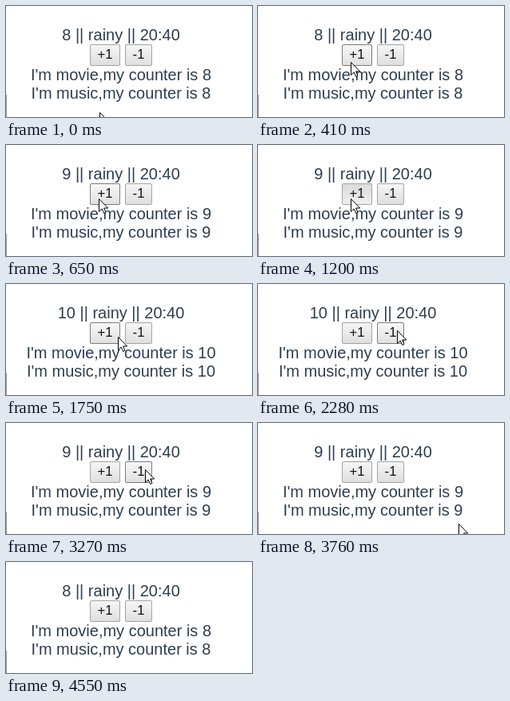
Recreate the animation shown at these times as an HTML page. Size 308 by 139 pixels, loop 4860 ms.

```html
<!DOCTYPE html>
<html lang="en">
<head>
<meta charset="utf-8">
<title>Counter</title>
<style>
  html, body { margin: 0; width: 100%; height: 100%; overflow: hidden; background: #fff; }
  svg { display: block; width: 308px; height: 139px; }
  text { font: 20px "Liberation Sans", Arial, sans-serif; fill: #2c3e50; text-anchor: middle; }
  .btn text { font-size: 16.67px; fill: #111; }
  .btn rect { fill: url(#normal); stroke: #a3a3a3; }
  .btn.hover rect { fill: url(#hover); stroke: #7c7c7c; }
  .btn.press rect { fill: url(#press); stroke: #a3a3a3; }
</style>
</head>
<body>
<svg viewBox="0 0 308 139">
  <defs>
    <linearGradient id="normal" x2="0" y2="1"><stop stop-color="#f6f6f6"/><stop offset="1" stop-color="#dedede"/></linearGradient>
    <linearGradient id="hover" x2="0" y2="1"><stop stop-color="#f8f8f8"/><stop offset="1" stop-color="#e0e0e0"/></linearGradient>
    <linearGradient id="press" x2="0" y2="1"><stop stop-color="#dadada"/><stop offset="1" stop-color="#f0f0f0"/></linearGradient>
  </defs>
  <path d="M.5 111V139" stroke="#999"/>
  <text id="status" x="144" y="43"></text>
  <g id="plus" class="btn"><rect x="105.5" y="48.5" width="37" height="26" rx="1.5"/><text x="124" y="66">+1</text></g>
  <g id="minus" class="btn"><rect x="149.5" y="48.5" width="33" height="26" rx="1.5"/><text x="166" y="66">-1</text></g>
  <text id="movie" x="144" y="93"></text>
  <text id="music" x="144" y="116"></text>
  <path id="cursor" d="M.5 .5V16.5L4.2 13L6.7 18.5L9 17.5L6.6 12H11.7Z" fill="#fff" stroke="#000"/>
</svg>
<script>
const LOOP = 4860;
const $ = id => document.getElementById(id);
const within = (t, from, to) => t >= from && t < to;
const mix = (a, b, k) => Math.round(a + (b - a) * k);

// Progress 0..1 in n even jumps, the first and last at the given times
function steps(t, first, last, n) {
  const i = Math.floor((t - first) / (last - first) * (n - 1) + 1.2);
  return Math.max(0, Math.min(n, i)) / n;
}

const easeOut = k => 1 - (1 - k) ** 2;
const overshoot = k => Math.sin(2 * k ** 0.8) / Math.sin(2);

// Tip of the pointer: up to +1, across to -1, then out at the bottom
function pointer(t) {
  if (t < 1600) {
    const k = easeOut(steps(t, 60, 540, 9));
    return [mix(117, 116, k), mix(133, 67, k)];
  }
  if (t < 3400) {
    const k = steps(t, 1750, 2220, 8);
    return [mix(116, 174, overshoot(k)), mix(67, 58, k)];
  }
  if (t < 3820) {
    const k = steps(t, 3460, 3820, 6);
    return [mix(174, 266, k), mix(58, 139, k)];
  }
  return within(t, 4010, 4120) ? [61, 116] : null;
}

function setButton(id, left, right, at, down) {
  const over = at && within(at[0], left, right) && within(at[1], 48, 75);
  $(id).setAttribute("class", "btn" + (over ? down ? " press" : " hover" : ""));
}

function draw(t) {
  const n = 8 + (t >= 650) + (t >= 1260) - (t >= 3270) - (t >= 4550);
  $("status").textContent = `${n} || rainy || 20:40`;
  for (const name of ["movie", "music"])
    $(name).textContent = `I'm ${name},my counter is ${n}`;

  const at = pointer(t);
  const down = within(t, 590, 650) || within(t, 1020, 1260);
  setButton("plus", 105, 143, at, down);
  setButton("minus", 149, 183, at, down);
  $("cursor").setAttribute("visibility", at ? "visible" : "hidden");
  if (at) $("cursor").setAttribute("transform", `translate(${at})`);
}

const start = performance.now();
function tick() {
  draw((performance.now() - start) % LOOP);
  requestAnimationFrame(tick);
}
tick();
</script>
</body>
</html>
```
